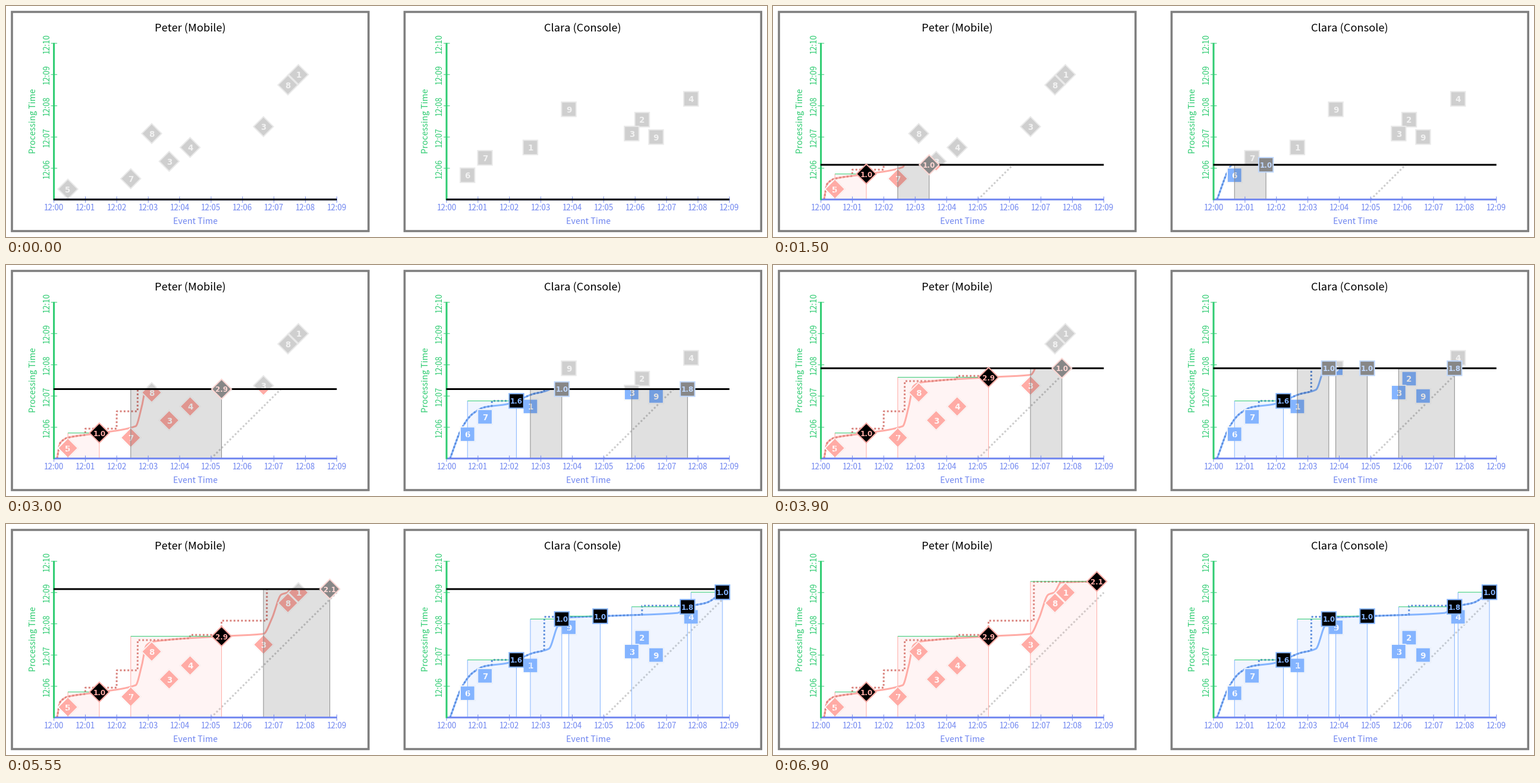
These frames come from a looping animation (1280 by 390 pixels, 8 s). A matplotlib script:

```python
import numpy as np
import matplotlib.pyplot as plt
from matplotlib.animation import FuncAnimation
from matplotlib.patches import Polygon, Rectangle
from matplotlib.transforms import Bbox, TransformedBbox

# Both time axes are measured in ninths of a minute: e for event time,
# k for processing time. The sweep line climbs one k per step.
W, H = 1280, 390
PT = 0.72                      # points per pixel at 100 dpi
TICK_MS, STEP_MS, LOOP_MS = 50, 150, 8000
MINUTE = 9
K_TOP, E_END = 5 * MINUTE, 9 * MINUTE
LAST = K_TOP + 1               # the sweep is over
BASE, TOP = 326.7, 63
SX, SY = 475.8 / E_END, (BASE - TOP) / K_TOP

GREEN, BLUE, FRAME = "#2ecc71", "#7187f0", "#7f7f7f"
DOTS = (0, (1, 1.1))

plt.rcParams["path.snap"] = False
fig = plt.figure(figsize=(W / 100, H / 100), dpi=100, facecolor="white")
ax = fig.add_axes([0, 0, 1, 1])
ax.set_xlim(0, W)
ax.set_ylim(H, 0)
ax.axis("off")

# Everything below the sweep line, in data units.
seen = Bbox([[0, BASE], [W, H]])
seen_box = TransformedBbox(seen, ax.transData)


def below_sweep(artist):
    artist.set_clip_box(seen_box)


def row_y(k):
    return BASE - SY * k


def line(xs, ys, color, width, z, style="-"):
    return ax.plot(xs, ys, color=color, lw=width * PT, ls=style, zorder=z,
                   solid_capstyle="butt", dash_capstyle="butt")[0]


def text(x, y, s, size, color, z=2, **kw):
    opts = dict(ha="center", va="center_baseline", family="Noto Sans CJK JP")
    opts.update(kw)
    return ax.text(x, y, s, fontsize=size * PT, color=color, zorder=z, **opts)


def bold(x, y, s, size, color, z):
    return text(x, y, s, size, color, z, family="DejaVu Sans",
                weight="bold", clip_on=True)


def badge(x, y, shape, fill, edge, width, z):
    if shape == "diamond":
        corners, r = [(-1, 0), (0, -1), (1, 0), (0, 1)], 16.6
    else:
        corners, r = [(-1, -1), (1, -1), (1, 1), (-1, 1)], 12.2
    pts = np.array([x, y]) + r * np.array(corners)
    return ax.add_patch(Polygon(pts, fc=fill, ec=edge, lw=width * PT,
                                joinstyle="miter", zorder=z))


def monotone(knots, x):
    """Rising cubic through the knots, with harmonic-mean slopes."""
    kx, ky = np.array(knots, float).T
    h = np.diff(kx)
    s = np.diff(ky) / h
    m = np.concatenate([s[:1], 2 * s[1:] * s[:-1] / (s[1:] + s[:-1]), s[-1:]])
    i = np.clip(np.searchsorted(kx, x, side="right") - 1, 0, len(h) - 1)
    u = (x - kx[i]) / h[i]
    ease = u * u * (3 - 2 * u)
    return (ky[i] + (ky[i + 1] - ky[i]) * ease
            + h[i] * u * (1 - u) * (m[i] * (1 - u) - m[i + 1] * u))


class Panel:
    def __init__(self, x0, title, shape, colors, events, knots, jumps):
        self.x0, self.shape, self.events = x0, shape, events
        self.main, self.dark, self.pale = colors
        self.live = []
        self.draw_axes(title)
        self.draw_events()
        self.draw_watermarks(knots, jumps)
        self.sweep = line(self.span, [BASE, BASE], "black", 3, 5)

    def x(self, e):
        return self.x0 + SX * e

    def draw_axes(self, title):
        x0 = self.x0
        self.span = [x0 - 0.5, self.x(E_END)]
        ax.add_patch(Rectangle((x0 - 70.6, 10), 599.8, 370, fill=False,
                               ec=FRAME, lw=3.6 * PT, joinstyle="miter"))
        text(x0 + 229.3, 36.4, title, 18.3, "black")
        text(x0 + 238, 363, "Event Time", 14.3, BLUE)
        text(x0 - 35, 194.5, "Processing Time", 14.3, GREEN, rotation=90,
             va="center")
        line(self.span, [BASE, BASE], BLUE, 3, 4.5)
        line([x0, x0], [TOP - 0.5, BASE + 1], GREEN, 3, 4.6)
        for m in range(10):
            x = self.x(MINUTE * m)
            line([x, x], [BASE - 5, BASE + 5.5], BLUE, 1, 4.5)
            text(x, 339.5, f"12:{m:02d}", 13.4, BLUE)
        for m in range(6, 11):
            y = row_y(MINUTE * (m - 5))
            line([x0 - 5, x0 + 5.5], [y, y], GREEN, 1, 4.6)
            text(x0 - 12, y, f"12:{m:02d}", 13.4, GREEN, rotation=90, va="center")

    def draw_events(self):
        for e, k, value in self.events:
            x, y, z = self.x(e), row_y(k), 3 - k / 1000
            badge(x, y, self.shape, "#cfcfcf", "#e9e9e9", 2, z)
            bold(x, y, str(value), 13.5, "#f1f1f1", z)
            below_sweep(badge(x, y, self.shape, self.main, "white", 1.6, z + 0.1))
            below_sweep(bold(x, y, str(value), 13.5, "white", z + 0.1))

    def draw_watermarks(self, knots, jumps):
        """Ideal diagonal, solid curve, and a dotted one that jumps ahead."""
        e = np.arange(knots[0][0], knots[-1][0] + 0.01, 0.05)
        k = monotone(knots, e)
        level = np.max([np.where(e >= je, jk, 0) for je, jk in jumps], axis=0)
        self.watermark = lambda end: np.interp(end, e, k)
        below_sweep(line([self.x(K_TOP), self.x(E_END)],
                         [BASE, row_y(E_END - K_TOP)], "#cccccc", 3, 1, DOTS))
        below_sweep(line(self.x(e), row_y(k), self.main, 3, 2))
        below_sweep(line(self.x(e), row_y(np.maximum(k, level)), self.dark,
                         3, 2.2, DOTS))

    def sessions(self, step):
        """Merge the arrived events that lie within a minute of each other."""
        spans = []
        for e, k, _ in sorted(self.events):
            if k > step:
                continue
            if spans and e <= spans[-1][1]:
                spans[-1][1] = e + MINUTE
            else:
                spans.append([e, e + MINUTE])
        return spans

    def draw_session(self, start, end, step):
        close = self.watermark(end)
        if step >= close:
            y, fill, alpha = row_y(close), self.main, 0.12
            edge, top, body, rim = self.main, GREEN, "black", self.main
        else:
            y, fill, alpha = row_y(step), "black", 0.12
            edge, top, body, rim = "#8a8a8a", "#8a8a8a", "#878787", self.pale
        xa, xb = self.x(start), self.x(end)
        label = f"{(end - start) / MINUTE:.1f}"
        self.live += [
            ax.add_patch(Rectangle((xa, y), xb - xa, BASE - y, fc=fill,
                                   alpha=alpha, lw=0, zorder=4)),
            line([xa, xa], [y, BASE], edge, 1, 4.1),
            line([xb, xb], [y, BASE], edge, 1, 4.1),
            line([xa, xb], [y, y], top, 1, 4.2),
            badge(xb, y, self.shape, body, rim, 2, 6),
            bold(xb, y, label, 11.9, rim, 6.1)]

    def update(self, step):
        for artist in self.live:
            artist.remove()
        self.live = []
        for start, end in self.sessions(step):
            self.draw_session(start, end, step)
        self.sweep.set_ydata([row_y(step)] * 2)
        self.sweep.set_visible(step < LAST)


# Events are (event time, arrival, score).
panels = [
    Panel(80.6, "Peter (Mobile)", "diamond", ("#ffaba5", "#d9827c", "#fdd6d3"),
          events=[(4, 3, 5), (22, 6, 7), (33, 11, 3), (39, 15, 4),
                  (28, 19, 8), (60, 21, 3), (67, 33, 8), (70, 36, 1)],
          knots=[(0.9, 0), (1.8, 4.5), (4, 6), (12, 7.2), (23.4, 9.3),
                 (25, 14.3), (26.5, 20.8), (28.5, 21.9), (48, 23.4),
                 (60, 24.1), (62.4, 28.5), (65.1, 35.4), (66.8, 36),
                 (68.8, 38.9), (79, 39.2)],
          jumps=[(9, 8.6), (18, 13.6), (24, 22.3), (39, 23.8), (48, 27.9),
                 (61, 39.1)]),
    Panel(741, "Clara (Console)", "square", ("#84b4ff", "#5b8bd9", "#c0d8fd"),
          events=[(6, 7, 6), (11, 12, 7), (24, 15, 1), (60, 18, 9),
                  (53, 19, 3), (56, 23, 2), (35, 26, 9), (70, 29, 4)],
          knots=[(1, 0), (4.4, 8.8), (7.5, 12.9), (11, 14.8), (17, 15.6),
                 (20, 16.6), (24.5, 18.5), (29.3, 19.8), (31.7, 26.1),
                 (33.5, 28.7), (44, 29.2), (66, 30.1), (69, 31.9),
                 (74.5, 33.1), (79, 36.1)],
          jumps=[(13, 16.6), (28, 29), (56, 32.2)]),
]


def update(i):
    step = min(i * TICK_MS // STEP_MS, LAST)
    seen.set_points(np.array([[0, row_y(step)], [W, H]]))
    for panel in panels:
        panel.update(step)
    return []


anim = FuncAnimation(fig, update, frames=LOOP_MS // TICK_MS, interval=TICK_MS,
                     init_func=lambda: update(0), repeat=True, repeat_delay=0)
plt.show()
```
